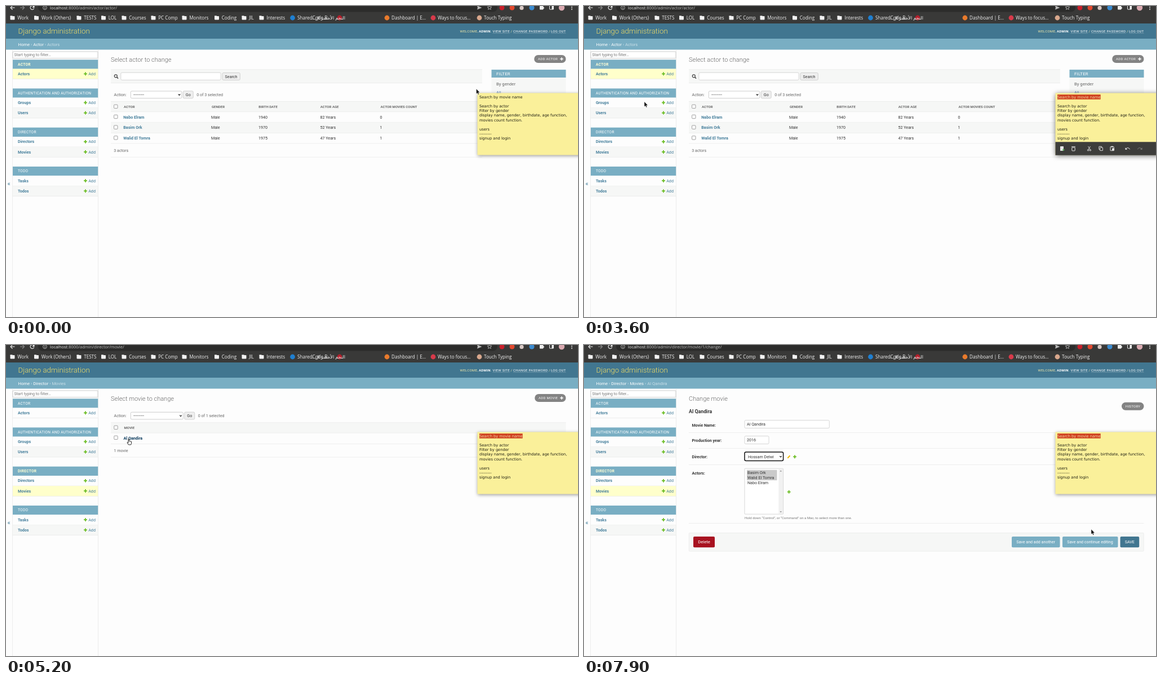
An HTML page with a canvas for the animation above (8 s loop, 1015 by 552 pixels).

```html
<!DOCTYPE html>
<html lang="en">
<head>
<meta charset="utf-8">
<title>Admin walkthrough</title>
<style>
html, body { margin: 0; width: 100%; height: 100%; overflow: hidden; background: #fdfdfd; }
canvas { display: block; }
</style>
</head>
<body>
<canvas id="stage" width="1015" height="552"></canvas>
<script>
const ctx = document.getElementById('stage').getContext('2d');
const LOOP = 8000, STEP = 100, RIGHT = 993.5;
const UI = 'Roboto, sans-serif';
const CHROME = '"Open Sans", "Noto Sans", "DejaVu Sans", sans-serif';
const NOTE = '"DejaVu Sans", sans-serif';
const HEADER = '#417690', BAR = '#79aec3', LINK = '#447e9b', GREY = '#666', DARK = '#333';
const GREEN = '#70bf2b', PALE = '#f6f7f6', RULE = '#e9e9e9', HOVER = '#0a3a5c';
const MOVIE = 'Al Qandira', DIRECTOR = 'Hossam Delwi';
const ACTORS = [['Nabo Elram', '1940', '82 Years', '0'],
                ['Basim Ork', '1970', '52 Years', '1'],
                ['Walid El Tomra', '1975', '47 Years', '1']];

// time, x, y, pointer shape (kept until the next key)
const POINTER = [
  [0, 834.5, 147, 'arrow'], [200, 843, 156, 'beam'], [400, 853, 162, 'beam'],
  [500, 853, 162, 'beam'], [700, 854, 162, 'beam'], [1100, 854, 162, 'beam'],
  [1200, 860, 164.5, 'beam'], [2500, 860, 164.5, 'beam'], [2600, 846, 164, 'arrow'],
  [2700, 846, 164, 'arrow'], [2800, 394, 136, 'arrow'], [2900, 394, 136, 'arrow'],
  [3100, 310, 96, 'arrow'], [3400, 130, 143, 'arrow'], [3500, 130, 143, 'arrow'],
  [3900, 38, 250, 'hand'], [4100, 34, 255, 'hand'], [4300, 34, 255, 'arrow'],
  [4600, 34, 255, 'arrow'], [4900, 40, 246, 'arrow'], [5000, 40, 246, 'arrow'],
  [5200, 218, 167, 'hand'], [5400, 219, 167, 'hand'], [5700, 235, 168, 'arrow'],
  [5900, 280, 173, 'arrow'], [6400, 325, 200, 'arrow'], [6700, 325, 200, 'arrow'],
  [7000, 322, 222, 'arrow'], [7100, 322, 222, 'arrow'], [7300, 400, 240, 'arrow'],
  [7600, 700, 298, 'arrow'], [7900, 900, 327, 'arrow'], [8000, 900, 327, 'arrow']
];

function text(str, x, y, size, color, { font = UI, weight = 400, spacing = 0 } = {}) {
  ctx.font = `${weight} ${size}px ${font}`;
  ctx.letterSpacing = spacing + 'px';
  ctx.fillStyle = color;
  ctx.fillText(str, x, y + size * 0.355);
  return x + ctx.measureText(str).width;
}
const bold = (str, x, y, color, size = 7.15) => text(str, x, y, size, color, { weight: 700 });
const plain = (str, x, y, color = DARK, size = 7.15) => text(str, x, y, size, color);

function rect(x, y, w, h, color) {
  ctx.fillStyle = color;
  ctx.fillRect(x, y, w, h);
}
function box(x, y, w, h, fill, stroke, radius = 2, width = 0.7) {
  ctx.beginPath();
  ctx.roundRect(x, y, w, h, radius);
  if (fill) { ctx.fillStyle = fill; ctx.fill(); }
  if (stroke) { ctx.strokeStyle = stroke; ctx.lineWidth = width; ctx.stroke(); }
}
function dot(x, y, r, color) {
  ctx.fillStyle = color;
  ctx.beginPath();
  ctx.arc(x, y, r, 0, 7);
  ctx.fill();
}
function ring(x, y, r, color, width = 1, from = 0, to = 7) {
  ctx.strokeStyle = color;
  ctx.lineWidth = width;
  ctx.beginPath();
  ctx.arc(x, y, r, from, to);
  ctx.stroke();
}
// Polyline from x,y pairs relative to an origin
function trace(x, y, points) {
  ctx.beginPath();
  for (let i = 0; i < points.length; i += 2) ctx.lineTo(x + points[i], y + points[i + 1]);
}
function line(x, y, points, color, width = 1) {
  trace(x, y, points);
  ctx.strokeStyle = color;
  ctx.lineWidth = width;
  ctx.stroke();
}
function poly(x, y, points, color) {
  trace(x, y, points);
  ctx.fillStyle = color;
  ctx.fill();
}
function plus(x, y, r, color, width = 1.9) {
  line(x, y, [-r, 0, r, 0], color, width);
  line(x, y, [0, -r, 0, r], color, width);
}
const rule = (x, y, right) => rect(x, y, right - x, 0.7, RULE);

function folder(x) {
  rect(x, 17.3, 4, 2, '#f2f2f2');
  box(x, 18, 8, 6.4, '#f2f2f2', null, 0.8);
}

function browser(url, loading) {
  rect(0, 0, 1015, 31, '#393938');
  box(57, -8, 815, 18.5, '#2c2c2b', null, 8);
  line(11.5, 3, [4, 0, -3.5, 0], '#eee', 1.1);
  line(11.5, 3, [0, -3.5, -3.5, 0, 0, 3.5], '#eee', 1.1);
  line(29, 3, [-4, 0, 3.5, 0], '#8a8a8a', 1.1);
  line(29, 3, [0, -3.5, 3.5, 0, 0, 3.5], '#8a8a8a', 1.1);
  if (loading) {
    line(46.5, 3, [-3, -3, 3, 3], '#eee', 1.2);
    line(46.5, 3, [3, -3, -3, 3], '#eee', 1.2);
  } else {
    ring(46.5, 3, 3.4, '#eee', 1.1, 0.3, 5.6);
    poly(46.5, 3, [4, -4, 4, 0, 0, 0], '#eee');
  }
  ring(69, 3, 3.4, '#ccc', 0.8);
  rect(68.6, 2.4, 0.9, 2.8, '#ccc');
  rect(68.6, 1, 0.9, 0.9, '#ccc');
  const end = text('localhost', 78, 3, 7.46, '#f2f2f2', { font: CHROME });
  text(url, end, 3, 7.46, '#c4c4c4', { font: CHROME });

  poly(840, 3, [-4, -3.6, 4.5, 0, -4, 3.6, -3, 0], '#bbb');
  const star = [];
  for (let i = 0; i <= 10; i++) {
    const r = i % 2 ? 1.8 : 4, a = i * Math.PI / 5;
    star.push(r * Math.sin(a), -r * Math.cos(a));
  }
  line(858, 3, star, '#ccc', 0.8);
  dot(880, 3, 4.5, '#c9202b');
  dot(898, 3, 4.5, '#e2492f');
  dot(915, 3.5, 3.6, '#d8c8c4');
  dot(933, 3, 4.6, '#3b8bd0');
  box(947, 0, 6.5, 6.5, '#eee', null, 1);
  dot(953.5, 3.3, 1.5, '#eee');
  box(964.5, -1, 7, 7, null, '#eee', 0.5, 1);
  rect(968.5, -1, 3, 7, '#eee');
  dot(986, 3, 5.2, '#d9a9b0');
  for (const y of [0, 3, 6]) dot(1004, y, 0.9, '#eee');

  const folders = [['Work', 7.5], ['Work (Others)', 50], ['TESTS', 125.5], ['LOL', 169], ['Courses', 205.5],
    ['PC Comp', 257.5], ['Monitors', 312.5], ['Coding', 370], ['JIL', 418.5], ['Interests', 449.5]];
  for (const [name, x] of folders) {
    folder(x);
    text(name, x + 12.7, 21, 8.1, '#f2f2f2', { font: CHROME });
  }
  const pages = [['SharedCode B…', 508.5, 517, '#1f7fd0'], ['النجم الأخضر ال…', 592, 602, '#b3202c'],
    ['Dashboard | E…', 676, 684, '#e87a2c'], ['Ways to focus…', 758, 766, '#d83a4a'], ['Touch Typing', 840, 848, '#d8a78c']];
  for (const [name, iconX, x, color] of pages) {
    dot(iconX, 21, 4.4, color);
    ctx.direction = /[a-z]/.test(name) ? 'ltr' : 'rtl';
    text(name, x, 21, 8.1, '#f2f2f2', { font: CHROME });
  }
  ctx.direction = 'ltr';
}

function siteHeader(crumbs) {
  rect(0, 31, 1015, 27, HEADER);
  rect(0, 58, 1015, 19.5, BAR);
  text('Django administration', 21.5, 44.5, 13.2, '#f0dc66', { weight: 300 });
  const tool = (str, x, color, weight = 400) => text(str, x, 44.5, 6.05, color, { weight, spacing: 0.275 });
  tool('WELCOME,', 805.5, '#f3e9a8');
  tool('.', tool('ADMIN', 839, '#fff', 700), '#f3e9a8');
  tool('/', 895.5, '#f3e9a8');
  tool('/', 963, '#f3e9a8');
  for (const [label, x] of [['VIEW SITE', 863.5], ['CHANGE PASSWORD', 900], ['LOG OUT', 967]]) {
    const end = tool(label, x, '#fff');
    rect(x, 48.2, end - x, 0.6, 'rgba(255,255,255,.35)');
  }
  let x = 21.5;
  crumbs.forEach((crumb, i) => {
    const last = i === crumbs.length - 1;
    x = plain(crumb, x, 68, last ? '#c9dfe8' : '#fff', 7.7);
    if (!last) x = plain(' › ', x, 68, '#c9dfe8', 7.7);
  });
}

function sidebar(open, current, hovered) {
  rect(11.3, 77.5, 0.7, 475, '#e6e6e6');
  plain(open ? '«' : '»', 2.4, 315.5, LINK, 11);
  if (!open) return;
  rect(163.2, 77.5, 0.7, 475, '#e2e2e2');
  box(12, 81, 151, 11.8, '#fff', '#b9b9b9', 0.5);
  plain('Start typing to filter…', 14.5, 86.7, '#777');
  const groups = [['ACTOR', 95.3, ['Actors']], ['AUTHENTICATION AND AUTHORIZATION', 146.4, ['Groups', 'Users']],
    ['DIRECTOR', 215.7, ['Directors', 'Movies']], ['TODO', 285, ['Tasks', 'Todos']]];
  for (const [title, y, items] of groups) {
    const active = items.includes(current);
    rect(12, y, 151.2, 16.3, BAR);
    text(title, 21, y + 8, 6.6, active ? '#ffffd6' : '#fff', { weight: active ? 700 : 400, spacing: 0.275 });
    items.forEach((item, i) => {
      const top = y + 16.3 + i * 18.2;
      rect(12, top, 151.2, 18.2, item === current ? '#ffffcb' : i ? PALE : '#fdfdfd');
      rule(12, top + 17.7, 163.2);
      bold(item, 21, top + 8.8, item === hovered ? HOVER : LINK);
      plus(141, top + 8.8, 2.9, GREEN);
      plain('Add', 146.2, top + 8.8, LINK);
    });
  }
}

function checkbox(x, y) {
  box(x + 0.3, y - 3.2, 6.4, 6.4, '#fff', '#777', 1);
}
function chevron(x, y) {
  line(x, y, [-1.8, -0.9, 0, 1, 1.8, -0.9], '#222', 1.1);
}
function button(label, x, y, w) {
  box(x, y - 6.5, w, 13, '#efefef', '#c3c3c3');
  plain(label, x + 4.6, y);
}
function pill(label, x, y, withPlus) {
  box(x, y - 7, RIGHT - x, 14, '#838383', null, 7);
  text(label, x + 6.8, y, 6.05, '#fff', { spacing: 0.275 });
  if (withPlus) plus(986, y, 2.8, '#fff', 1.5);
}
function heading(label, x) {
  text(label, x, 95.5, 11, GREY, { weight: 300 });
}
function actions(x, y, selectWidth, count) {
  plain('Action:', x + 5.5, y, GREY);
  box(x + 35.3, y - 6.3, selectWidth, 12.6, '#fff', '#bbb');
  plain('---------', x + 40, y, DARK, 7.7);
  chevron(x + 31 + selectWidth, y);
  button('Go', x + 37.7 + selectWidth, y, 18);
  plain(count, x + 61.7 + selectWidth, y, GREY);
}
function columnTitle(label, x, y) {
  text(label, x, y, 6.05, GREY, { weight: 700 });
}

function actorList() {
  const x = 186, right = 845;
  heading('Select actor to change', x);
  pill('ADD ACTOR', 937.2, 94, true);

  rect(x, 112.5, right - x, 24.3, PALE);
  rule(x, 112.5, right);
  rule(x, 136.4, right);
  ring(194.8, 124.3, 2.5, '#444', 1.2);
  line(196.6, 126.1, [0, 0, 2.4, 2.6], '#444', 1.6);
  box(203.8, 118.2, 177.4, 13.2, '#fff', '#c6c6c6');
  button('Search', 384, 125, 31.3);

  rect(861.5, 113, RIGHT - 861.5, 14, BAR);
  rect(861.5, 127, RIGHT - 861.5, 100, PALE);
  text('FILTER', 870, 120, 7.7, '#fff', { spacing: 0.275 });
  plain('By gender', 870, 138.5, GREY, 7.7);
  plain('All', 870, 153.7, '#5b80b2');

  actions(x, 157.4, 90.5, '0 of 3 selected');
  rect(x, 169.3, right - x, 18.5, PALE);
  rule(x, 169.3, right);
  rule(x, 187.5, right);
  checkbox(191.3, 178.4);
  [['ACTOR', 209], ['GENDER', 365], ['BIRTH DATE', 448.3], ['ACTOR AGE', 557.8], ['ACTOR MOVIES COUNT', 664.5]]
    .forEach(([label, cx]) => columnTitle(label, cx, 179));
  ACTORS.forEach(([name, born, age, movies], i) => {
    const y = 197 + i * 18.7;
    if (i === 1) rect(x, y - 9.2, right - x, 18.7, PALE);
    checkbox(191.3, y - 0.5);
    bold(name, 208.3, y, LINK);
    plain('Male', 364, y);
    plain(born, 448, y);
    plain(age, 557.5, y);
    plain(movies, 663.5, y);
    rule(x, y + 9.2, right);
  });
  plain('3 actors', 191.3, 256.5, GREY);
  rule(x, 267.8, right);
}

function movieList(x, hovered) {
  heading('Select movie to change', x);
  pill('ADD MOVIE', 938.2, 94, true);
  actions(x, 125.6, 93, '0 of 1 selected');
  rect(x, 137.5, RIGHT - x, 18.5, PALE);
  rule(x, 137.5, RIGHT);
  rule(x, 155.7, RIGHT);
  checkbox(x + 5.5, 146.4);
  columnTitle('MOVIE', x + 23.5, 147);
  checkbox(x + 5.5, 164.4);
  bold(MOVIE, x + 22.5, 165, hovered ? HOVER : LINK);
  rule(x, 175, RIGHT);
  plain('1 movie', x + 5.5, 187, GREY);
  rule(x, 198.7, RIGHT);
}

function movieForm(x, { spinner, focused, popup }) {
  heading('Change movie', x);
  bold(MOVIE, x, 118, DARK, 8.8);
  pill('HISTORY', 954, 108.8, false);
  [['Movie Name:', 142], ['Production year:', 169.7], ['Director:', 198], ['Actors:', 227]]
    .forEach(([label, y]) => bold(label, x + 5.5, y, DARK));
  for (const y of [155.3, 183.3, 212.2, 316]) rule(x, y, RIGHT);

  const fx = x + 99;
  box(fx, 133.6, 150.3, 14, '#fff', '#c6c6c6');
  plain(MOVIE, fx + 4, 140.8);
  box(fx, 161.6, 43, 14, '#fff', '#c6c6c6');
  plain('2016', fx + 4, 168.8);
  if (spinner) {
    box(fx + 32.5, 164.5, 6, 8.5, '#eee', null, 0.5);
    poly(fx + 35.5, 168, [-2.2, 0, 0, -2.6, 2.2, 0], '#444');
    poly(fx + 35.5, 169.2, [-2.2, 0, 0, 2.6, 2.2, 0], '#444');
  }
  box(fx, 190, 68.6, 15.6, '#fff', focused ? '#111' : '#c6c6c6', 2.5, focused ? 1.5 : 0.7);
  plain(DIRECTOR, fx + 6, 198);
  chevron(fx + 64, 198);
  line(fx + 76.3, 200.7, [0, 0, 4.2, -4.4], '#efb80b', 2);
  plus(fx + 89, 198.3, 2.9, GREEN);

  box(fx, 219.2, 68.6, 81, '#fff', '#c6c6c6', 1);
  rect(fx + 4, 221.8, 53.5, 18.4, '#cacaca');
  [ACTORS[1], ACTORS[2], ACTORS[0]].forEach(([name], i) => plain(name, fx + 5, 226.2 + i * 9.1));
  rect(fx + 60.3, 219.8, 7.8, 80, '#f1f1f1');
  poly(fx + 64.2, 224.5, [-1.8, 0, 0, -2, 1.8, 0], '#888');
  poly(fx + 64.2, 295.3, [-1.8, 0, 0, 2, 1.8, 0], '#888');
  plus(fx + 78.7, 260.7, 2.9, GREEN);
  plain('Hold down “Control”, or “Command” on a Mac, to select more than one.', fx, 306.8, '#777', 6.05);

  box(x + 0.3, 333.6, RIGHT - x - 0.6, 32.5, PALE, RULE, 1);
  box(x + 8, 340, 38, 19.2, '#a81220', null, 2);
  plain('Delete', x + 16.2, 349.6, '#fff', 7.7);
  [['Save and add another', 759, 85.5, BAR], ['Save and continue editing', 849, 98.5, BAR], ['SAVE', 951.5, 33.7, HEADER]]
    .forEach(([label, bx, w, color]) => {
      box(bx, 340, w, 19.2, color, null, 2);
      plain(label, bx + 8.2, 349.8, '#fff');
    });
  if (popup) {
    box(fx, 206, 68.6, 21, '#fff', '#aaa', 0.5);
    rect(fx + 0.5, 216.5, 67.6, 10, '#cfcfcf');
    plain('---------', fx + 6, 211.3);
    plain(DIRECTOR, fx + 6, 221.5);
  }
}

function noteIcons(hasSelection) {
  const on = '#e6e6e6', off = '#7c7c7c', edit = hasSelection ? on : off, y = 253;
  box(845, y - 4, 6, 8, on, null, 0.5);
  plus(850.7, y + 2.3, 1.8, '#5cb85c', 1.3);
  box(865.8, y - 2, 5.4, 6, null, on, 0.8, 1);
  line(868.5, y - 3.2, [-3.5, 0, 3.5, 0], on, 1);
  line(896.5, y, [-2, -4, 1.8, 2], edit, 0.9);
  line(896.5, y, [2, -4, -1.8, 2], edit, 0.9);
  ring(894.6, y + 2.9, 1.2, edit, 0.9);
  ring(898.4, y + 2.9, 1.2, edit, 0.9);
  box(913.8, y - 3.7, 4.8, 5.4, null, edit, 0.4, 0.9);
  box(915.6, y - 1.8, 4.8, 5.4, '#3d3d3b', edit, 0.4, 0.9);
  box(934, y - 3.3, 6.2, 7, null, on, 0.5, 1);
  rect(935.6, y - 4.3, 3, 2, on);
  rect(937, y - 0.5, 4, 4, on);
  const arc = (cx, side, color) => {
    ring(cx, y + 2.5, 3.7, color, 1, Math.PI * 1.1, Math.PI * 1.9);
    poly(cx, y, [side * 4.5, -1.8, side * 4.5, 2, side * 1, 1.8], color);
  };
  arc(965, -1, on);
  arc(986, 1, off);
}

function stickyNote({ focused, toolbar, selection }) {
  ctx.save();
  ctx.shadowColor = focused ? 'rgba(0,0,0,.65)' : 'rgba(0,0,0,.4)';
  ctx.shadowBlur = focused ? 9 : 6;
  ctx.shadowOffsetY = 1;
  rect(836.5, 154.5, 185, 110, '#faf09a');
  ctx.restore();
  const lines = ['Search by movie name', '', 'Search by actor', 'Filter by gender',
    'display name, gender, birthdate, age function,', 'movies count function.', '', 'users', '---------', 'signup and login'];
  const selected = lines[0].slice(0, selection);
  lines.forEach((str, i) => text(str, 840, 161.4 + i * 8.15, 6.66, '#1c1c10', { font: NOTE }));
  if (selected) {
    ctx.font = `6.66px ${NOTE}`;
    ctx.letterSpacing = '0px';
    rect(840, 157.2, ctx.measureText(selected).width, 8.5, '#cf3f1d');
    text(selected, 840, 161.4, 6.66, '#f6d9a8', { font: NOTE });
  }
  if (toolbar) {
    rect(836.5, 241.3, 180, 23.5, '#3d3d3b');
    noteIcons(selection > 0);
  }
}

function statusBubble(path) {
  ctx.font = `8.18px ${CHROME}`;
  ctx.letterSpacing = '0px';
  const label = 'localhost:8000' + path;
  box(-3, 541, ctx.measureText(label).width + 8.5, 14, '#2b2b2a', '#555', 2);
  text(label, 2, 547, 8.18, '#eee', { font: CHROME });
}

function pointer(t) {
  const i = POINTER.findLastIndex(key => key[0] <= t);
  const [t0, x0, y0, shape] = POINTER[i], [t1, x1, y1] = POINTER[i + 1];
  const k = (t - t0) / (t1 - t0), x = x0 + (x1 - x0) * k, y = y0 + (y1 - y0) * k;
  if (shape === 'beam') {
    line(x, y, [-2, -5, 2, -5], '#222', 0.9);
    line(x, y, [-2, 5, 2, 5], '#222', 0.9);
    line(x, y, [0, -5, 0, 5], '#222', 1);
    return;
  }
  const outline = shape === 'arrow'
    ? [0, 0, 0, 9, 2, 7.2, 3.4, 10.3, 4.9, 9.6, 3.5, 6.7, 6.2, 6.5, 0, 0]
    : [-1, 0, 0.3, 0, 0.5, 3.6, 4.6, 4.5, 4.6, 7.6, 3.6, 10, -0.6, 10, -3, 6.2, -2.4, 5.5, -1, 6.5, -1, 0];
  const arrow = shape === 'arrow';
  poly(x, y, outline, arrow ? '#111' : '#fff');
  line(x, y, outline, arrow ? 'rgba(255,255,255,.8)' : '#111', arrow ? 0.5 : 0.9);
}

function draw(t) {
  const page = t < 4300 ? 'actors' : t < 5700 ? 'movies' : 'form';
  const loading = (t >= 4200 && t < 4600) || (t >= 5600 && t < 5800);
  const open = !((t >= 4300 && t < 4600) || (t >= 5700 && t < 5800));
  const path = { actors: '/admin/actor/actor/', movies: '/admin/director/movie/', form: '/admin/director/movie/1/change/' }[page];
  const crumbs = { actors: ['Home', 'Actor', 'Actors'], movies: ['Home', 'Director', 'Movies'],
    form: ['Home', 'Director', 'Movies', MOVIE] }[page];
  const left = open ? 186 : 34;

  rect(0, 0, 1015, 552, '#fdfdfd');
  browser(':8000' + path, loading);
  siteHeader(crumbs);
  sidebar(open, page === 'actors' ? 'Actors' : 'Movies', t >= 3900 && t < 4300 ? 'Movies' : '');
  if (page === 'actors') actorList();
  else if (page === 'movies') movieList(left, t >= 5200);
  else movieForm(left, { spinner: t < 6200, focused: t >= 6800, popup: t >= 6800 && t < 7200 });

  stickyNote({
    focused: t >= 900 && t < 4200,
    toolbar: t >= 200 && t < 3700,
    selection: t < 1200 ? 0 : t < 1500 ? 6 : 20
  });
  if (t >= 4200 && t < 4700) statusBubble('/admin/director/movie/');
  if (t >= 5400 && t < 6300) statusBubble('/admin/director/movie/1/change/');
  pointer(t);
}

function tick(now) {
  draw(Math.floor((now % LOOP) / STEP) * STEP);
  requestAnimationFrame(tick);
}
draw(0);
requestAnimationFrame(tick);
</script>
</body>
</html>
```
